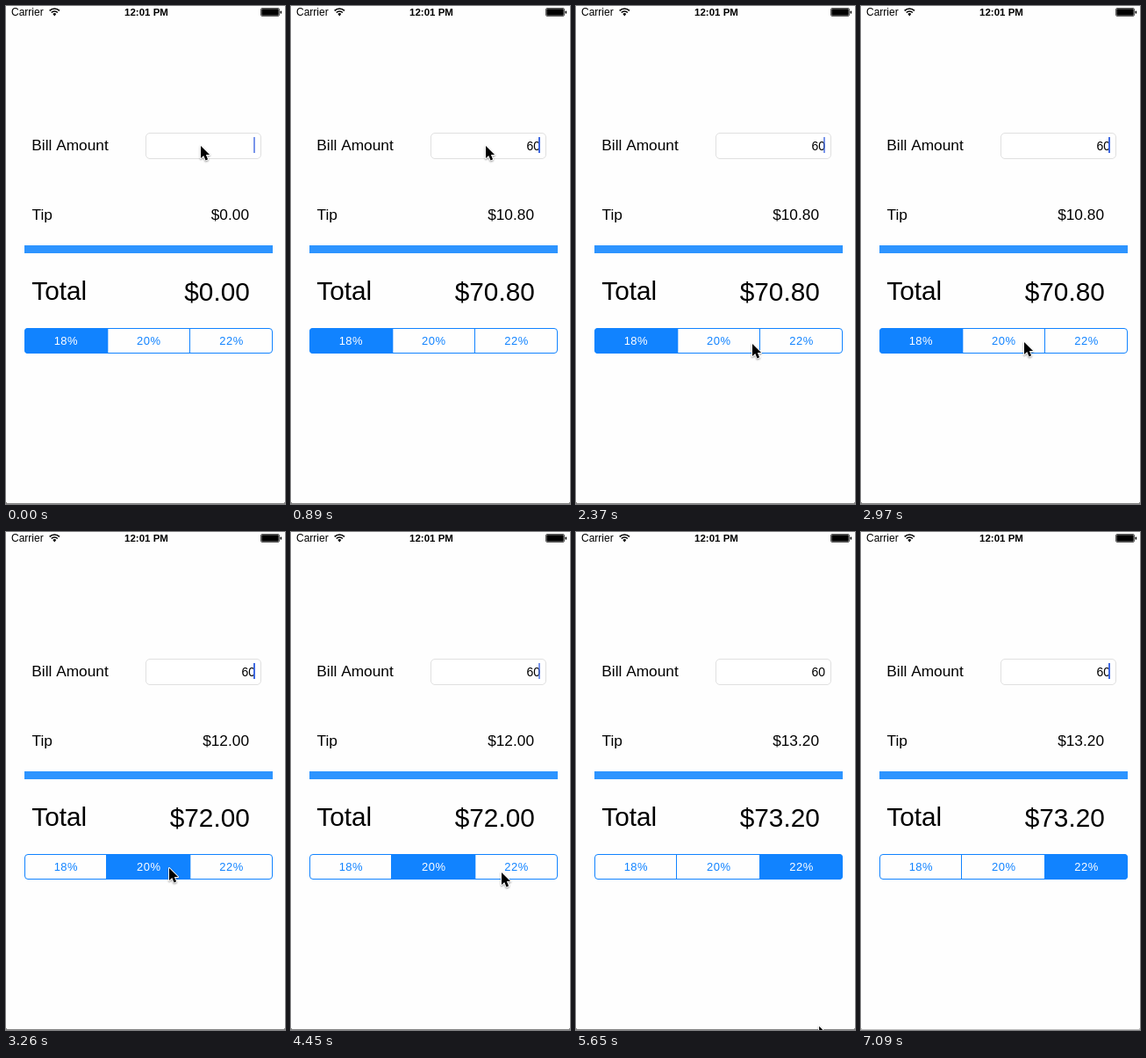
Recreate the animation shown at these times as an HTML page with a canvas. Size 318 by 566 pixels, loop 7190 ms.

```html
<!DOCTYPE html>
<html lang="en">
<head>
<meta charset="utf-8">
<title>Tip calculator</title>
<style>
html, body { margin: 0; width: 100%; height: 100%; overflow: hidden; background: #fefefe; }
canvas { display: block; width: 318px; height: 566px; }
</style>
</head>
<body>
<canvas id="stage" width="318" height="566"></canvas>
<script>
const ctx = document.getElementById('stage').getContext('2d');
const LOOP = 7190, STEP = 148.4, CLOSING = 7090;
const BLUE = [17, 131, 255];
const RATES = [18, 20, 22];
const LEFT = 21, TOP = 366, WIDTH = 283, HEIGHT = 29;

// The screen is sampled once per step; all moments below are in steps.
const ENTRY = '60', KEYSTROKES = [4, 6], TAPS = [21, 32];
const BLINK = 1010 / STEP, FIRST_BLINK = -450 / STEP;
const HOME = { x: 222, y: 159 };
const MOVES = [
  { from: 9, to: 12, x: 216, y: 191 },
  { from: 12, to: 16, x: 201, y: 384 },
  { from: 16, to: 19, x: 186, y: 382 },
  { from: 25, to: 28, x: 240, y: 387 },
  { from: 35, to: 39, x: 284, y: 594 }
];

const smooth = u => u * u * (3 - 2 * u);
const clamp = u => Math.max(0, Math.min(1, u));
const passed = (moments, k) => moments.filter(m => m <= k).length;

function pointerAt(k) {
  return MOVES.reduce((p, m) => {
    const u = smooth(clamp((k - m.from) / (m.to - m.from)));
    return { x: p.x + (m.x - p.x) * u, y: p.y + (m.y - p.y) * u };
  }, HOME);
}

// Every keystroke restarts the blink: on, fading, off, returning.
function caretAt(k) {
  const typed = passed(KEYSTROKES, k);
  const phase = (k - (typed ? KEYSTROKES[typed - 1] : FIRST_BLINK)) / BLINK % 1;
  if (phase < 0.405 || phase > 0.955) return 1;
  return phase < 0.53 || phase > 0.885 ? 0.7 : 0;
}

function blue(white = 0) {
  return `rgb(${BLUE.map(c => Math.round(c + (255 - c) * white)).join(',')})`;
}

function text(str, x, y, size, { align = 'left', color = '#000', weight = 'normal', gap = 0 } = {}) {
  ctx.font = `${weight} ${size}px "Liberation Sans", Arial, sans-serif`;
  ctx.letterSpacing = gap + 'px';
  ctx.textAlign = align;
  ctx.fillStyle = color;
  ctx.fillText(str, x, y);
}

function roundBox(x, y, w, h, r) {
  ctx.beginPath();
  ctx.roundRect(x, y, w, h, r);
}

function statusBar() {
  text('Carrier', 6, 11.3, 12);
  text('12:01 PM', 160, 11, 11.5, { align: 'center', weight: 'bold' });

  ctx.strokeStyle = ctx.fillStyle = '#000';
  ctx.lineWidth = 1.6;
  const from = -Math.PI * 0.75, to = -Math.PI * 0.25;
  for (const r of [5, 8]) {
    ctx.beginPath();
    ctx.arc(55.3, 11, r, from, to);
    ctx.stroke();
  }
  ctx.beginPath();
  ctx.moveTo(55.3, 11.6);
  ctx.arc(55.3, 11, 2.8, from, to);
  ctx.fill();

  ctx.strokeStyle = '#555';
  ctx.lineWidth = 1;
  roundBox(290.5, 2.5, 21, 9, 1.5);
  ctx.stroke();
  roundBox(291.3, 3.3, 19.4, 7.4, 0.8);
  ctx.fill();
  roundBox(312.6, 5.4, 1.5, 3.4, 0.8);
  ctx.fill();
}

function field(bill, caret) {
  roundBox(159.5, 144.5, 131, 29, 4.5);
  ctx.fillStyle = '#fff';
  ctx.fill();
  ctx.strokeStyle = '#e0e0e0';
  ctx.lineWidth = 1;
  ctx.stroke();
  text(bill, 284, 164, 14, { align: 'right' });
  ctx.globalAlpha = caret;
  ctx.fillStyle = '#4069e2';
  ctx.fillRect(282, 149, 2, 18);
  ctx.globalAlpha = 1;
}

function segments(choice, fading) {
  const cell = WIDTH / RATES.length;
  ctx.save();
  roundBox(LEFT, TOP, WIDTH, HEIGHT, 4);
  ctx.clip();
  RATES.forEach((rate, i) => {
    const chosen = i === choice, leaving = fading && i === choice - 1;
    const level = leaving || (chosen && fading) ? 0.54 : chosen ? 1 : 0;
    const x = LEFT + Math.round(cell * i);
    ctx.fillStyle = blue(1 - level);
    if (level) ctx.fillRect(x, TOP, cell + 1, HEIGHT);
    text(rate + '%', LEFT + cell * (i + 0.5) + 0.2, 385, 13,
      { align: 'center', color: blue(leaving ? 0.6 : level), gap: 0.45 });
  });
  ctx.restore();

  ctx.strokeStyle = ctx.fillStyle = blue();
  ctx.lineWidth = 1;
  roundBox(LEFT + 0.5, TOP + 0.5, WIDTH - 1, HEIGHT - 1, 3.5);
  ctx.stroke();
  for (const i of [1, 2]) ctx.fillRect(Math.floor(LEFT + cell * i - 0.5), TOP, 1, HEIGHT);
}

function windowEdge(color) {
  ctx.fillStyle = color;
  ctx.fillRect(0, 565, 318, 1);
  ctx.fillRect(0, 564, 1, 1);
  ctx.fillRect(317, 564, 1, 1);
}

function pointer({ x, y }) {
  ctx.save();
  ctx.translate(x, y);
  ctx.scale(1.05, 1.05);
  ctx.beginPath();
  [[0, 0], [0, 13.4], [3.1, 10.5], [5.3, 15.6], [7.7, 14.6], [5.6, 9.6], [9.6, 9.6]]
    .forEach(([px, py]) => ctx.lineTo(px, py));
  ctx.closePath();
  ctx.lineJoin = 'round';
  ctx.shadowColor = 'rgba(0,0,0,0.4)';
  ctx.shadowBlur = 2;
  ctx.shadowOffsetY = 1;
  ctx.strokeStyle = '#fff';
  ctx.lineWidth = 1.8;
  ctx.stroke();
  ctx.shadowColor = 'transparent';
  ctx.fillStyle = '#000';
  ctx.fill();
  ctx.restore();
}

function draw(t) {
  const k = Math.floor(t / STEP + 0.05);
  const bill = ENTRY.slice(0, passed(KEYSTROKES, k));
  const choice = passed(TAPS, k);
  const tip = bill * RATES[choice] / 100;
  const money = n => '$' + n.toFixed(2);

  ctx.fillStyle = '#fefefe';
  ctx.fillRect(0, 0, 318, 566);
  statusBar();
  text('Bill Amount', 29.3, 164, 17.3);
  field(bill, caretAt(k));
  text('Tip', 29.5, 243.2, 17.3);
  text(money(tip), 277, 243.2, 17.3, { align: 'right' });
  ctx.fillStyle = '#2d94ff';
  ctx.fillRect(LEFT, 272, WIDTH, 9);
  text('Total', 29.3, 334, 29.8);
  text(money(Number(bill) + tip), 277.8, 334.7, 29.8, { align: 'right' });
  segments(choice, TAPS.includes(k));
  windowEdge(t < CLOSING ? '#858585' : '#bdbdbd');
  pointer(pointerAt(k));
}

const start = performance.now();
function tick() {
  draw((performance.now() - start) % LOOP);
  requestAnimationFrame(tick);
}
tick();
</script>
</body>
</html>
```
